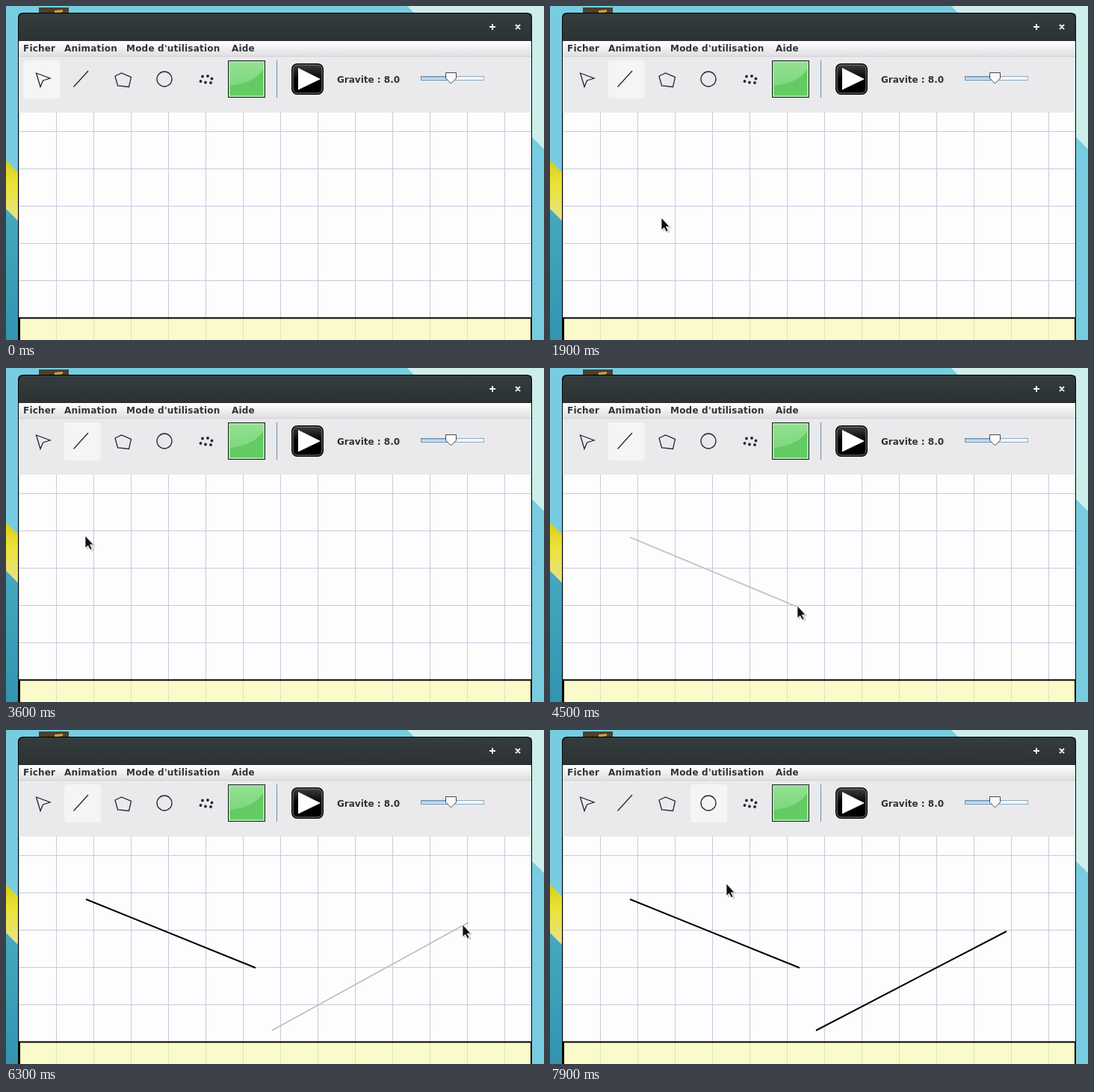
Recreate the animation shown at these times as an HTML page. Size 720x448 px, loop 8000 ms.

```html
<!DOCTYPE html>
<html lang="fr">
<head>
<meta charset="utf-8">
<title>Animation</title>
<style>
  html, body { margin: 0; width: 100%; height: 100%; overflow: hidden; background: #78cce0; }
  svg { display: block; width: 720px; height: 448px; }
  text { font: bold 12px "DejaVu Sans", sans-serif; fill: #333; }
  .menu { letter-spacing: .2px; }
  .icon { fill: none; stroke: #26262c; stroke-width: 1.3; }
  .dots { fill: none; stroke: #22223a; stroke-width: 3.8; stroke-linecap: round; }
  .final { stroke: #000; stroke-width: 2; }
  .preview { stroke: #c0c0c0; stroke-width: 1.8; }
</style>
</head>
<body>
<svg viewBox="0 0 720 448">
  <defs>
    <linearGradient id="sea" x2="0" y2="1">
      <stop offset="0" stop-color="#48aac2"/><stop offset="1" stop-color="#3294ae"/>
    </linearGradient>
    <linearGradient id="gold" x2="0" y2="1">
      <stop offset="0" stop-color="#d8cc20"/><stop offset=".4" stop-color="#ece238"/>
      <stop offset="1" stop-color="#e6e28c"/>
    </linearGradient>
    <linearGradient id="title" x2="0" y2="1">
      <stop offset="0" stop-color="#343c3e"/><stop offset="1" stop-color="#2c3234"/>
    </linearGradient>
    <linearGradient id="menu" x2="0" y2="1">
      <stop offset="0" stop-color="#fff"/><stop offset="1" stop-color="#dedee2"/>
    </linearGradient>
    <linearGradient id="green" x2="0" y2="1">
      <stop offset="0" stop-color="#92e092"/><stop offset="1" stop-color="#74d474"/>
    </linearGradient>
    <linearGradient id="track" x2="0" y2="1">
      <stop offset="0" stop-color="#8fb2d2"/><stop offset="1" stop-color="#f0f6fc"/>
    </linearGradient>
    <linearGradient id="play" x2="0" y2="1">
      <stop offset="0" stop-color="#3c3c3c"/><stop offset=".5" stop-color="#000"/>
    </linearGradient>
    <pattern id="grid" x="67" y="168" width="50" height="50" patternUnits="userSpaceOnUse">
      <path d="M.5 0V50M0 .5H50" stroke="#c8c8e0"/>
    </pattern>
  </defs>

  <!-- desktop -->
  <path fill="#78cce0" d="M0 0H720V448H0z"/>
  <path fill="#cdeeea" d="M537 0H720V192L704 176V10H547z"/>
  <path fill="url(#sea)" d="M0 254L17 272V448H0z"/>
  <path fill="url(#gold)" d="M0 207L17 224V289L0 272z"/>
  <path fill="#4a4030" d="M44 2H84V11H44z"/>
  <path fill="#c8a048" d="M65 6L76 5V8L65 10z"/>

  <!-- window -->
  <path d="M16 448V16Q16 9 23 9H697Q704 9 704 16V448z"/>
  <path fill="url(#title)" d="M17 47V17Q17 10 24 10H696Q703 10 703 17V47z"/>
  <path fill="none" stroke="#f4f4f4" stroke-width="2" d="M647 28H655M651 24V32M682 25L688 31M688 25L682 31"/>
  <path fill="url(#menu)" d="M17 47H703V68H17z"/>
  <path fill="#eaeaec" d="M17 68H703V143H17z"/>
  <path stroke="#d2d2d6" d="M17 67.500H703"/>
  <g class="menu">
    <text x="23" y="61">Ficher</text>
    <text x="78" y="61">Animation</text>
    <text x="161" y="61">Mode d'utilisation</text>
    <text x="302" y="61">Aide</text>
  </g>

  <!-- toolbar -->
  <rect id="active" y="73" width="49" height="51" rx="4" fill="#f5f5f5"/>
  <path class="icon" d="M40.500 90L59 97L49.500 100L46 108.500z"/>
  <path class="icon" d="M90.500 108.500L110 87"/>
  <path class="icon" d="M146 94L154.500 90L167.500 95.500L164.500 108.500L149.500 107z"/>
  <circle class="icon" cx="212" cy="98" r="10"/>
  <path class="dots" d="M263 94.500h0M270 94h0M275.500 97.500h0M260.500 101h0M267 102.500h0M274 103h0"/>
  <rect x="297.500" y="73.500" width="49" height="49" fill="#a8e2a8" stroke="#16201a"/>
  <path fill="url(#green)" d="M300 76H344V120H300z"/>
  <path fill="#62cc62" d="M300 107Q331 104 344 85V120H300z"/>
  <path stroke="#6c8cb0" d="M362.500 73V123"/>
  <rect x="382" y="77" width="43" height="42" rx="8"/>
  <rect x="384" y="79" width="39" height="38" rx="6" fill="url(#play)" stroke="#8a8a8a"/>
  <path fill="#fff" d="M391 83L421 98L391 112.500z"/>
  <text x="443" y="103">Gravite : 8.0</text>
  <rect x="555.500" y="94.500" width="84" height="5" fill="#f4f6f8" stroke="#8caac4"/>
  <rect x="555.500" y="94.500" width="38" height="5" fill="url(#track)" stroke="#648cb4"/>
  <path fill="#fafafa" stroke="#44484c" d="M588.500 89.500H602.500V97L595.500 104L588.500 97z"/>

  <!-- canvas -->
  <path fill="#fdfdfd" d="M17 143H703V448H17z"/>
  <path fill="url(#grid)" d="M17 143H703V448H17z"/>
  <path fill="#f8f8a0" fill-opacity=".55" d="M18 418H703V448H18z"/>
  <path fill="none" stroke="#000" stroke-width="2" d="M18 448V418.500H703V448"/>
  <line id="lineA" x1="107" y1="227"/>
  <line id="lineB" x1="356" y1="403"/>

  <g id="cursor">
    <path fill="#888" fill-opacity=".35" d="M2 1V18L6 14.500L9 20L12 18.500L9.500 13H14z"/>
    <path fill="#101010" stroke="#f4f4f4" stroke-width=".8" d="M0 -1V15.500L3.700 12.200L6.500 17.800L9 16.600L6.300 11H11z"/>
  </g>
</svg>
<script>
  const LOOP = 8000, STEP = 100;
  const el = id => document.getElementById(id);
  const cursor = el('cursor'), active = el('active');

  // pointer stops: time, x, y, then an optional sideways swing on the way there
  const stops = [
    [100, 706, 280], [1100, 98, 96],
    [1900, 149, 285, 560, 130], [2700, 106, 226, 560, 80], [3600, 106, 226, -40, -150],
    [4400, 330, 320], [4700, 334, 319], [5500, 353, 404, 0, 60], [5600, 356, 403],
    [6100, 627, 254], [6300, 611, 262], [6500, 611, 270],
    [7200, 172, 38], [7400, 208, 95], [7800, 236, 207]
  ];

  const lines = [
    { node: el('lineA'), start: 3600, commit: 4700 },
    { node: el('lineB'), start: 5600, commit: 6500 }
  ];

  const ease = p => p * p * (3 - 2 * p);

  function pointer(time) {
    const t = Math.min(Math.max(time, stops[0][0]), stops.at(-1)[0]);
    const i = Math.max(1, stops.findIndex(stop => stop[0] >= t));
    const [t0, x0, y0] = stops[i - 1];
    const [t1, x1, y1, swingX = 0, swingY = 0] = stops[i];
    const p = (t - t0) / (t1 - t0), e = ease(p), swing = Math.sin(Math.PI * p) ** 2;
    return [x0 + (x1 - x0) * e + swingX * swing, y0 + (y1 - y0) * e + swingY * swing];
  }

  function drawLine({ node, start, commit }, t) {
    const done = t >= commit;
    // the preview trails the pointer by one step
    const [x, y] = pointer(done ? commit : t - STEP);
    node.style.display = t > start ? '' : 'none';
    node.setAttribute('class', done ? 'final' : 'preview');
    node.setAttribute('x2', x);
    node.setAttribute('y2', y);
  }

  function draw(now) {
    const t = Math.floor(now % LOOP / STEP) * STEP;
    const [x, y] = pointer(t).map(Math.round);
    cursor.style.display = t < stops[0][0] ? 'none' : '';
    cursor.setAttribute('transform', `translate(${x} ${y})`);
    active.setAttribute('x', t < 1100 ? 23 : t < 7400 ? 78 : 188);
    lines.forEach(line => drawLine(line, t));
  }

  const begin = performance.now();
  function tick() {
    draw(performance.now() - begin);
    requestAnimationFrame(tick);
  }
  tick();
</script>
</body>
</html>
```
